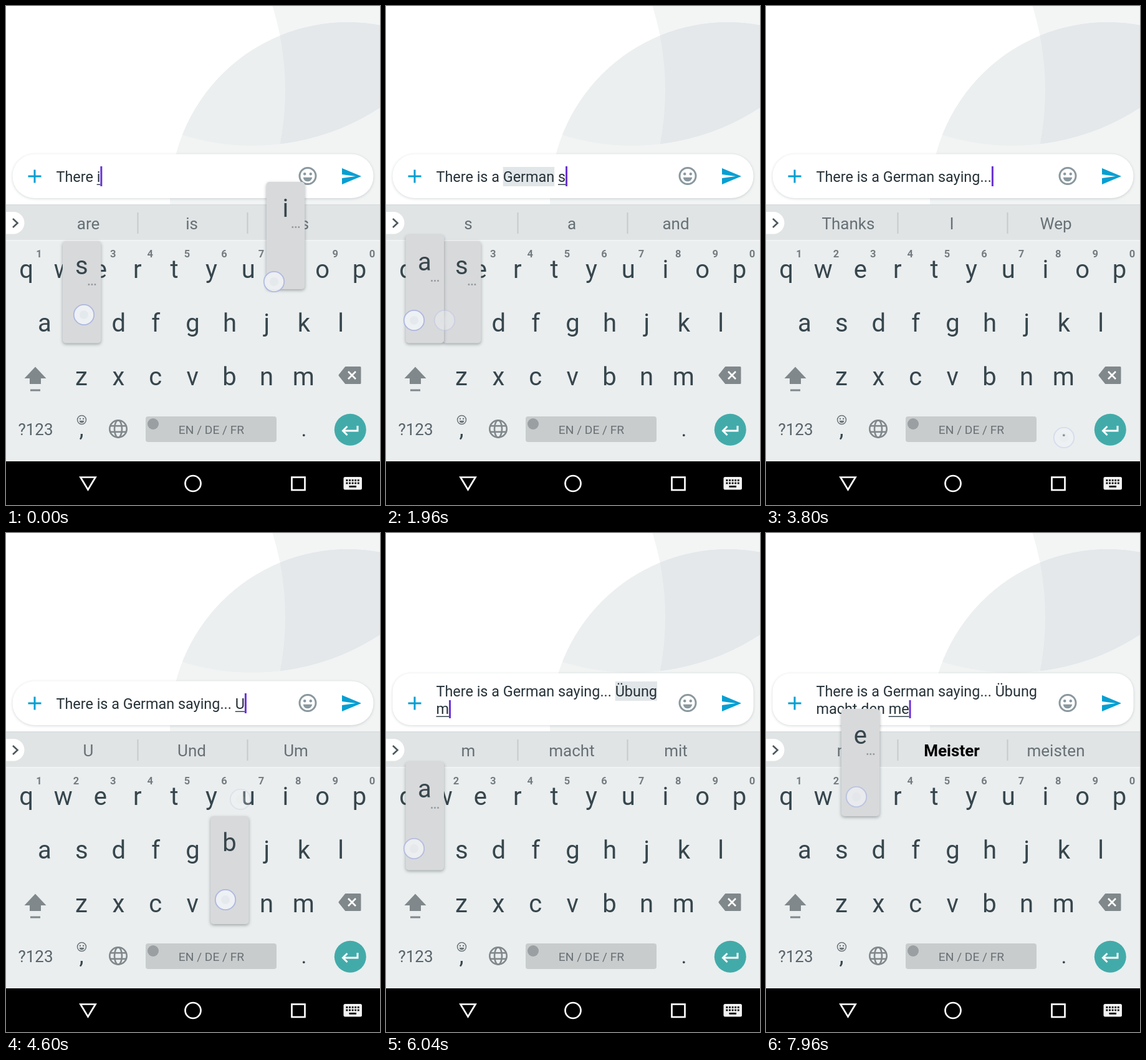
Recreate the animation shown at these times as an HTML page with a canvas. Size 600x800 px, loop 8000 ms.

```html
<!DOCTYPE html>
<html lang="en">
<head>
<meta charset="utf-8">
<title>Typing on a phone keyboard</title>
<style>
html, body { margin: 0; width: 100%; height: 100%; overflow: hidden; background: #fff; }
canvas { display: block; width: 600px; height: 800px; }
</style>
</head>
<body>
<canvas id="stage" width="600" height="800"></canvas>
<script>
const c = document.getElementById('stage').getContext('2d');
const LOOP = 8000, STEP = 40;
const COMMIT = 100, LAG = 55, POPUP = 250, FADE = 300;
const FONT = 'Roboto, "Open Sans", sans-serif';
const INK = '#37464d', ICON = '#80888b', BLUE = '#069fd2';
const TEXT_SIZE = 23.4, TEXT_X = 80.5;

// Key positions: letter -> {x, base line, row}
const keys = {};
'qwertyuiop'.split('').forEach((k, i) => keys[k] = { x: 32.5 + i * 59.4, y: 436, row: 0, digit: (i + 1) % 10 });
'asdfghjkl'.split('').forEach((k, i) => keys[k] = { x: 62 + i * 59.4, y: 522, row: 1 });
'zxcvbnm'.split('').forEach((k, i) => keys[k] = { x: 121 + i * 59.4, y: 608, row: 2 });
const HAS_MORE = 'eruioyasnczl';

// Taps: press time, key, touch x, touch y, text after it, suggestions after it
const INTRO = 'There is a ', SAY = INTRO + 'German ', DOTS = SAY + 'saying... ', UB = DOTS + 'Übung ';
const START = { text: 'There i', words: 'are,is,this' };
const taps = [
  [-120, 'i', 430, 442, 'There i', 'is,it,in'],
  [-40, 's', 125, 495, 'There is', 'is,its,isn’t'],
  [140, ' ', 318, 682, 'There is ', 'a,no,something'],
  [340, 'a', 42, 503, 'There is a', 'a,an,also'],
  [500, ' ', 338, 682, INTRO, 'lot,few,good'],
  [700, 'f', 226, 506, INTRO + 'f', 'f,few,friend'],
  [840, 'w', 86, 425, INTRO + 'fw', 'fw,*few,FW'],
  [960, 'r', 189, 425, INTRO + 'fwr', 'fwr,*few,German'],
  [1080, 'm', 472, 584, INTRO + 'fwrm', 'fwrm,*firm,German'],
  [1220, 'a', 43, 506, INTRO + 'fwrma', 'fwrma,*German,Germany'],
  [1360, 'b', 386, 588, INTRO + 'fwrmab', 'fwrmab,*German,Germany'],
  [1500, ' ', 330, 696, SAY, 'and,guy,language'],
  [1730, 's', 94, 504, SAY + 's', 's,a,and'],
  [1880, 'a', 45, 504, SAY + 'sa', 'sa,saw,same'],
  [2040, 'y', 322, 427, SAY + 'say', 'say,saying,says'],
  [2180, 'i', 433, 429, SAY + 'sayi', 'sayi,*saying,sayings'],
  [2360, 'n', 406, 588, SAY + 'sayin', 'sayin,*saying,sayings'],
  [2500, 'g', 282, 503, SAY + 'saying', 'saying,sayings,staying'],
  [3250, '.', 478, 692, SAY + 'saying.', 'Thanks,I,Wep'],
  [3410, '.', 478, 692, SAY + 'saying..', 'Thanks,I,Wep'],
  [3570, '.', 478, 692, SAY + 'saying...', 'Thanks,I,Wep'],
  [3805, ' ', 326, 698, DOTS, 'I,The,Thanks'],
  [4350, 'u', 376, 427, DOTS + 'U', 'U,Und,Um'],
  [4560, 'b', 352, 588, DOTS + 'Ub', 'Ub,Über,Ubuntu'],
  [4740, 'i', 434, 428, DOTS + 'Ubi', 'Ubi,*Über,Ubuntu'],
  [4910, 'b', 354, 588, DOTS + 'Ubib', 'Ubib,*Übung,Ubuntu'],
  [5080, 'g', 280, 504, DOTS + 'Ubibg', 'Ubibg,*Übung,Ubuntu'],
  [5200, ' ', 319, 697, UB, 'macht,und,mit'],
  [5690, 'm', 470, 586, UB + 'm', 'm,macht,mit'],
  [6020, 'a', 45, 506, UB + 'ma', 'ma,mal,macht'],
  [6160, 'c', 228, 588, UB + 'mac', 'mac,macht,machen'],
  [6310, 'h', 346, 506, UB + 'mach', 'mach,macht,machen'],
  [6440, 't', 243, 426, UB + 'macht', 'macht,MacVornel,Macvornel'],
  [6660, ' ', 355, 698, UB + 'macht ', 'das,den,sich'],
  [6900, 'd', 170, 506, UB + 'macht d', 'd,das,den'],
  [7040, 'e', 142, 425, UB + 'macht de', 'de,den,der'],
  [7220, 'n', 408, 588, UB + 'macht den', 'den,denn,denen'],
  [7420, ' ', 344, 700, UB + 'macht den ', 'Unterschied,Meister,Weg'],
  [7650, 'm', 468, 588, UB + 'macht den m', 'm,Meister,mit'],
  [7800, 'e', 145, 423, UB + 'macht den me', 'me,*Meister,meisten']
].map(([t, key, x, y, text, words]) => ({ t, key, x, y, text, words }));

function label(s, x, y, size, color, align = 'center', weight = 400) {
  c.font = `${weight} ${size}px ${FONT}`;
  c.textAlign = align;
  c.fillStyle = color;
  c.fillText(s, x, y);
}
function box(x, y, w, h, r, color) {
  c.beginPath();
  c.roundRect(x, y, w, h, r);
  c.fillStyle = color;
  c.fill();
}
function circle(x, y, r) {
  c.beginPath();
  c.arc(x, y, r, 0, 7);
}
function dot(x, y, r, color) {
  circle(x, y, r);
  c.fillStyle = color;
  c.fill();
}
function path(points, close) {
  c.beginPath();
  points.forEach(([x, y]) => c.lineTo(x, y));
  if (close) c.closePath();
}
function shape(points, color) {
  path(points, true);
  c.fillStyle = color;
  c.fill();
}
function stroke(color, width) {
  c.strokeStyle = color;
  c.lineWidth = width;
  c.stroke();
}
function shadow(color, blur, dy) {
  c.shadowColor = color;
  c.shadowBlur = blur;
  c.shadowOffsetY = dy;
}
function ellipsis(x, y, color) {
  for (let i = -1; i < 2; i++) box(x + i * 5 - 1.3, y - 1.3, 2.6, 2.6, 0.5, color);
}

function backdrop() {
  c.fillStyle = '#fff';
  c.fillRect(0, 0, 600, 800);
  const outsideLeft = () => {
    c.beginPath();
    c.rect(0, 0, 600, 318);
    c.arc(-8, 135, 456, 0, Math.PI * 2, true);
  };
  outsideLeft();
  c.fillStyle = '#f3f5f5';
  c.fill('evenodd');
  dot(548, 311, 285, '#f2f4f4');
  c.save();
  circle(548, 311, 285);
  c.clip();
  circle(395, -151, 375);
  c.clip();
  c.fillStyle = '#eceff0';
  c.fillRect(0, 0, 600, 318);
  outsideLeft();
  c.fillStyle = '#e4e8eb';
  c.fill('evenodd');
  c.restore();
}

function smiley(x, y, r, color, width) {
  circle(x, y, r);
  stroke(color, width);
  dot(x - r * 0.37, y - r * 0.25, r * 0.17, color);
  dot(x + r * 0.37, y - r * 0.25, r * 0.17, color);
  c.beginPath();
  c.arc(x, y + r * 0.12, r * 0.56, 0.1, Math.PI - 0.1);
  c.fillStyle = color;
  c.fill();
}

function field(t, text, marks, cursorOn) {
  const twoLines = text.startsWith(UB) && text.length > UB.length;
  const top = twoLines ? 225 : 237.5;
  c.save();
  shadow('rgba(60,75,80,.22)', 4, 1);
  box(10.5, top, 579, 308 - top, twoLines ? 29 : 35, '#fff');
  c.restore();

  c.fillStyle = BLUE;
  c.fillRect(35.5, 271.5, 21, 3);
  c.fillRect(44.5, 262.5, 3, 21);
  smiley(484, 272.5, 13, '#8a989f', 3);
  shape([[539, 260], [570, 273], [539, 286], [539, 276], [561, 273], [539, 270]], BLUE);

  const lines = twoLines ? [UB.trim(), text.slice(UB.length)] : [text];
  const bases = twoLines ? [262, 290] : [282];
  c.font = `400 ${TEXT_SIZE}px ${FONT}`;
  const width = s => c.measureText(s).width;
  for (const m of marks) {
    if (t < m.from || t >= m.to) continue;
    const x = TEXT_X + width(m.before);
    c.fillStyle = '#e1e6e9';
    c.fillRect(x, bases[0] - 24, width(m.word), 31);
  }
  lines.forEach((s, i) => label(s, TEXT_X, bases[i], TEXT_SIZE, '#263238', 'left'));

  const line = lines[lines.length - 1], base = bases[bases.length - 1];
  const cut = line.lastIndexOf(' ') + 1, end = TEXT_X + width(line);
  if (cut < line.length && !line.endsWith('.')) {
    const x = TEXT_X + width(line.slice(0, cut));
    c.fillStyle = '#37464d';
    c.fillRect(x, base + 3.5, end - x, 1.5);
  }
  if (cursorOn) {
    c.fillStyle = '#6a32d6';
    c.fillRect(end, twoLines ? 268 : 257, 3, twoLines ? 29 : 32);
  }
}

function suggestions(words) {
  c.fillStyle = '#e0e4e5';
  c.fillRect(0, 318, 600, 58);
  c.fillStyle = '#d8dddf';
  c.fillRect(0, 318, 600, 1.5);
  c.fillStyle = '#f1f4f4';
  c.fillRect(0, 375, 600, 2.5);
  c.fillStyle = '#c5cacc';
  c.fillRect(210.5, 331, 2, 34);
  c.fillRect(386.5, 331, 2, 34);
  box(-20, 330, 49.5, 35.5, 17.7, '#fff');
  path([[11, 341], [18.5, 348], [11, 355]]);
  stroke('#4c585d', 2.6);
  words.split(',').forEach((w, i) => {
    const bold = w[0] === '*';
    label(bold ? w.slice(1) : w, [132, 298, 465][i], 358, 26, bold ? '#000' : '#667075', 'center', bold ? 700 : 400);
  });
}

function keyboard(caps, spaceDown) {
  c.fillStyle = '#eaeeef';
  c.fillRect(0, 377, 600, 353);
  for (const k in keys) {
    const { x, y, digit } = keys[k];
    label(caps ? k.toUpperCase() : k, x, y, 40, INK);
    if (digit !== undefined) label(digit, x + 20.5, 403, 16.5, '#747c80', 'center', 700);
  }
  const shift = caps ? INK : ICON;
  shape([[47, 578.5], [64.5, 597], [56, 597], [56, 606], [38, 606], [38, 597], [29.5, 597]], shift);
  c.fillStyle = shift;
  c.fillRect(39, 614.5, 16, 3);

  c.lineJoin = 'round';
  shape([[535, 592], [545, 579.5], [568, 579.5], [568, 604.5], [545, 604.5]], ICON);
  stroke(ICON, 3);
  c.lineJoin = 'miter';
  path([[549, 586], [561, 598]]);
  stroke('#fff', 2.6);
  path([[561, 586], [549, 598]]);
  stroke('#fff', 2.6);

  label('?123', 47.5, 688, 26, '#59646a');
  smiley(121.5, 663.5, 7, '#6b7478', 1.5);
  label(',', 121, 690, 36, INK);
  globe(180, 678);
  box(224, 658, 210, 41, 4, spaceDown ? '#b4bbc1' : '#c9cccd');
  dot(236, 670, 9, '#9a9fa2');
  label('EN / DE / FR', 329.5, 686, 19.2, '#697175');
  label('.', 478, 690, 34, INK);

  dot(552.3, 679.3, 25.5, '#42abaa');
  path([[564, 673], [564, 681], [541, 681]]);
  stroke('#fff', 3);
  path([[547.5, 674], [540.5, 681], [547.5, 688]]);
  stroke('#fff', 3);
}

function globe(x, y) {
  circle(x, y, 13.7);
  stroke(ICON, 2.6);
  c.beginPath();
  c.ellipse(x, y, 6, 13.7, 0, 0, 7);
  stroke(ICON, 2.6);
  for (const d of [-4.8, 4.8]) {
    path([[x - 12.8, y + d], [x + 12.8, y + d]]);
    stroke(ICON, 2.6);
  }
}

function navBar() {
  c.fillStyle = '#000';
  c.fillRect(0, 730, 600, 70);
  path([[119.5, 755.5], [143.5, 755.5], [131.5, 775.5]], true);
  stroke('#fff', 2.7);
  circle(300, 765.5, 12.5);
  stroke('#fff', 2.7);
  c.strokeRect(458.5, 755.5, 21, 20.5);
  box(541.5, 755, 29.5, 20.5, 2.5, '#f2f2f2');
  c.fillStyle = '#000';
  for (let i = 0; i < 10; i++) c.fillRect(545.5 + i % 5 * 4.6, 759 + (i > 4 ? 4.6 : 0), 2.8, 2.8);
  c.fillRect(550.5, 769, 11.5, 2.8);
}

function popup(key, caps) {
  const { x, y, row } = keys[key];
  const low = key === 's';
  const top = 282 + row * 86 - (row === 1 ? 1 : 0) + (low ? 10 : 0);
  const bottom = 454 + row * 86.5;
  const base = y - 98 + (low ? 6 : 0);
  c.save();
  shadow('rgba(40,50,55,.38)', 5, 2);
  box(x - 30.5, top, 61.5, bottom - top, 5, '#d8d9db');
  c.restore();
  label(caps ? key.toUpperCase() : key, x, base, 40, INK);
  if (HAS_MORE.includes(key)) ellipsis(x + 16.5, base + 16.5, '#8f9599');
}

function touch({ x, y }, age) {
  const a = age < 40 ? 0.75 + age / 160 : Math.min(1, (FADE - age) / 190);
  c.save();
  c.globalAlpha = a;
  dot(x, y, 16.5, 'rgba(242,245,247,.88)');
  circle(x, y, 16.2);
  stroke('rgba(150,163,218,.7)', 1.8);
  dot(x, y, 7, 'rgba(222,228,232,.6)');
  c.restore();
}

const marks = [
  { before: INTRO, word: 'German', from: 1600, to: 2600 },
  { before: DOTS, word: 'Übung', from: 5300, to: 6120 }
];

function draw(t) {
  const last = delay => taps.filter(p => t >= p.t + delay).pop();
  const done = last(COMMIT);
  const seen = last(COMMIT + LAG);
  const text = done ? done.text : START.text;
  const words = seen ? seen.words : START.words;
  const caps = !!seen && text === DOTS;
  const idle = done ? t - done.t - COMMIT : 0;
  const live = taps.filter(p => t >= p.t && t < p.t + FADE);
  const spaceDown = live.some(p => p.key === ' ' && t - p.t > 50 && t - p.t < 140);

  backdrop();
  field(t, text, marks, idle % 1000 < 500);
  suggestions(words);
  keyboard(caps, spaceDown);
  navBar();
  for (const p of live) {
    const age = t - p.t;
    if (keys[p.key] && age >= 20 && age < POPUP) popup(p.key, p.text === DOTS + 'U');
  }
  for (const p of live) touch(p, t - p.t);
}

const begin = performance.now();
function frame() {
  const t = (performance.now() - begin) % LOOP;
  draw(Math.floor(t / STEP) * STEP);
  requestAnimationFrame(frame);
}
frame();
</script>
</body>
</html>
```
